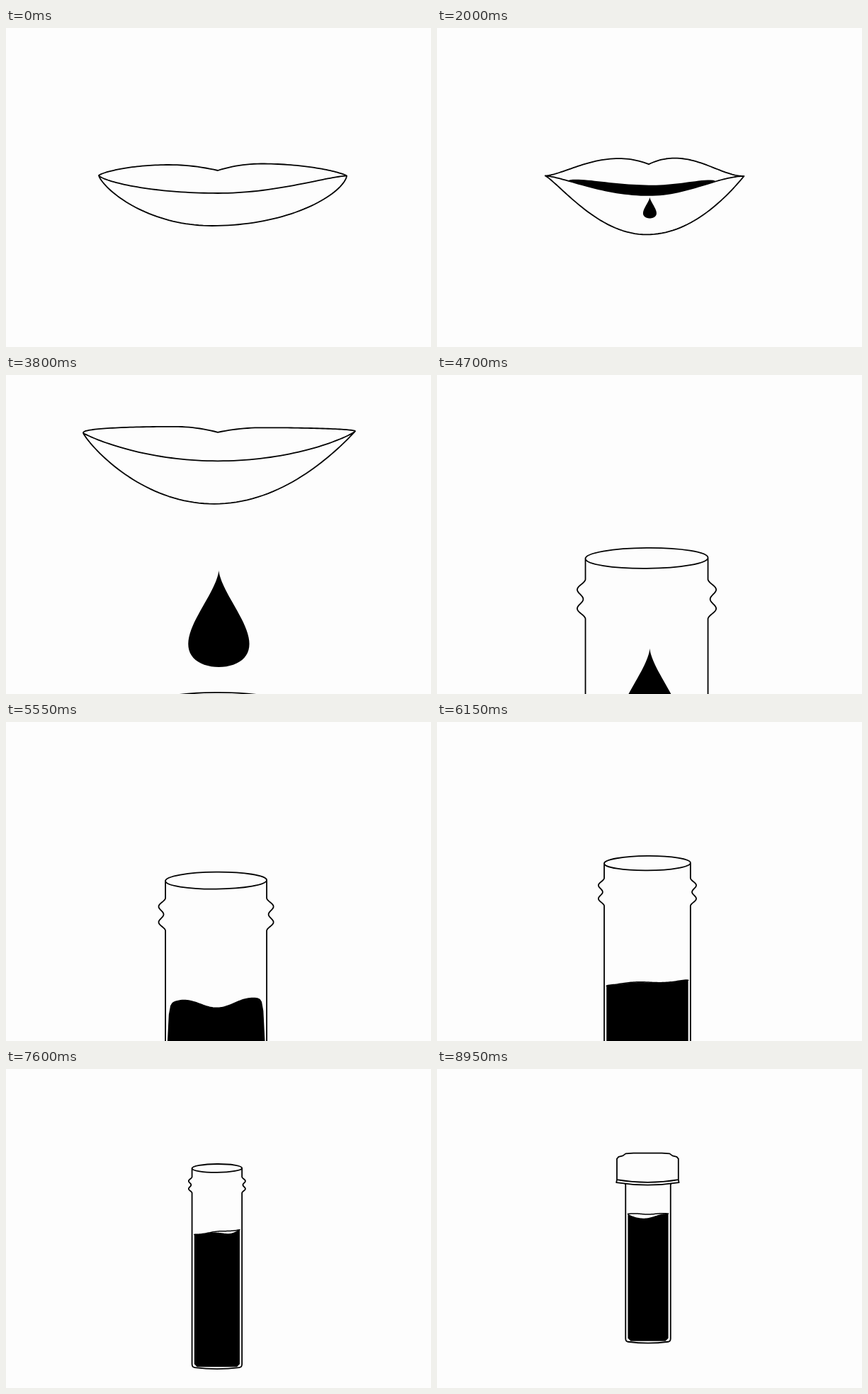
An HTML page with a canvas that plays this animation: 600x450 px, repeating every 9 s.

```html
<!DOCTYPE html>
<html lang="en">
<head>
<meta charset="utf-8">
<style>
html, body { margin: 0; width: 100%; height: 100%; overflow: hidden; background: #fdfdfd; }
canvas { display: block; }
</style>
</head>
<body>
<canvas id="stage" width="600" height="450"></canvas>
<script>
const ctx = document.getElementById('stage').getContext('2d');
const LOOP = 9000, STEP = 50, LINE = 1.8, PAPER = '#fdfdfd', INK = '#000';

const mix = (a, b, k) => a + (b - a) * k;
const smooth = u => 0.5 - 0.5 * Math.cos(Math.PI * u);
const linear = u => u;
const span = (t, from, to) => Math.min(1, Math.max(0, (t - from) / (to - from)));
const sample = (n, f) => Array.from({ length: n + 1 }, (_, i) => f(i / n));

// Value at time t between [time, value] keys.
function track(keys, t, ease = smooth) {
  let v = keys[0][1];
  for (let i = 1; i < keys.length; i++) {
    v = mix(v, keys[i][1], ease(span(t, keys[i - 1][0], keys[i][0])));
  }
  return v;
}

// Extremes of each lip edge, followed by how round the edge is on its way to the corners.
const REST = {
  left: [131, 208], right: [481, 208.5], notch: [299, 201],
  crestL: [230, 193, 0.76], crestR: [360, 191.5, 0.8],
  inner: [299, 233, 0.7, 1.4], lower: [291, 279, 0.75, 0.65]
};
const PURSED = {
  left: [153, 208.5], right: [433, 209], notch: [299, 192],
  crestL: [257, 184, 1.6], crestR: [335, 183.5, 2],
  inner: [299, 236, 1.45, 1.9], lower: [296, 291.5, 1.2, 1]
};
const SMILE = {
  left: [109, 202], right: [493, 199.5], notch: [299, 201],
  crestL: [238, 193, 0.4], crestR: [362, 194.5, 0.5],
  inner: [299, 241.5, 0.9, 0.85], lower: [294, 302, 0.87, 0.98]
};

const POSE = [[1200, 0], [2050, 1], [2150, 1], [3250, 2], [3450, 2.06], [3800, 2]];
const PAN = [[3500, 0], [4205, 313]];
const DROP_SIZE = [[1690, 0], [2000, 0.22], [3150, 1]];
const DROP_Y = [[1690, 232], [3800, 275], [4150, 283]];
const WIDTH = [[4400, 183.6], [7800, 63.5]];
const LEVEL = [[4750, 190], [5550, 130], [6750, 163.5], [7600, 136], [7850, 123]];
const TILT = [[5550, -3], [6750, -6], [7600, -9.5], [8950, -0.5]];
const SKEW = [[5550, 0], [6750, -1], [7600, 1.26], [8950, -0.67]];
const CREST = [[5550, 0.16], [6750, 0.55], [7600, 0.5], [8950, 0.15]];
const CAP_Y = [[7900, -112], [8750, 0]];

function line(points) {
  points.forEach((p, i) => i ? ctx.lineTo(...p) : ctx.moveTo(...p));
}

function stroke(width = LINE) {
  ctx.lineWidth = width;
  ctx.stroke();
}

function fillShape(points) {
  ctx.beginPath();
  line(points);
  ctx.fill();
}

// Rounded arc from a mouth corner to the extreme of an edge.
const arc = ([cx, cy], [px, py], round) => sample(40, u => {
  const a = u * Math.PI / 2;
  return [mix(px, cx, Math.cos(a)), mix(cy, py, Math.sin(a) ** (2 * round))];
});

const dip = ([x, y], [nx, ny]) => sample(12, u => [mix(x, nx, u), mix(y, ny, u * u)]);

function lipPose(s) {
  const [a, b, k] = s < 1 ? [REST, PURSED, s] : [PURSED, SMILE, s - 1];
  const pose = {};
  for (const part in a) pose[part] = a[part].map((v, i) => mix(v, b[part][i], k));
  return pose;
}

function drawLips(t, pan) {
  const s = track(POSE, t);
  const { left, right, notch, crestL, crestR, inner, lower } = lipPose(s);
  const edge = e => [...arc(left, e, e[2]), ...arc(right, e, e[3]).reverse()];
  const mouth = edge(inner);
  ctx.save();
  ctx.translate(0, -pan);
  ctx.beginPath();
  line([...arc(left, crestL, crestL[2]), ...dip(crestL, notch)]);
  line([...arc(right, crestR, crestR[2]), ...dip(crestR, notch)]);
  line(mouth);
  line(edge(lower));
  stroke();

  const open = 14.5 * Math.max(0, 1 - Math.abs(s - 1));
  const gap = x => open * Math.max(0, 1 - ((x - 289.5) / 104.5) ** 2) ** 0.65;
  fillShape([...mouth, ...mouth.map(([x, y]) => [x, y - gap(x)]).reverse()]);
  ctx.restore();
}

function drawDrop(t) {
  const size = track(DROP_SIZE, t, linear);
  if (!size || t > 4900) return;
  ctx.save();
  ctx.translate(300.4, track(DROP_Y, t, linear) + 190 * span(t, 4150, 4900) ** 2);
  ctx.scale(size, size);
  fillShape(sample(80, u => {
    const a = 2 * Math.PI * u;
    return [68.3 * Math.sin(a) * Math.sin(a / 2) ** 2.2, 68.5 * (1 - Math.cos(a))];
  }));
  ctx.restore();
}

// One half of the tube: neck with two ridges, straight wall, rounded foot.
function tubeSide(dir) {
  const ridges = sample(40, u => {
    const bulge = 5.4 * Math.sin(2 * Math.PI * u) ** 2 + 1.8 * Math.sin(Math.PI * u);
    return [dir * (50 + bulge), mix(26, 58, u)];
  });
  line([[dir * 50, 8.5], ...ridges, [dir * 50, 400]]);
  ctx.quadraticCurveTo(dir * 50, 406.5, dir * 45, 407);
  ctx.quadraticCurveTo(dir * 22, 410, 0, 410);
}

function drawLiquid(t, s) {
  const level = track(LEVEL, t), tilt = track(TILT, t), crest = track(CREST, t);
  const splash = 1 - smooth(span(t, 5550, 6200));
  const gap = Math.max(0, (t - 6000) / 310), skew = 2 ** track(SKEW, t);
  const half = 50 - 3.2 / s, base = 410 - 3 / s, r = 4 / s;
  const back = sample(60, u => [
    mix(-half, half, u),
    level + tilt * (u - 0.5)
      - (1 + 3.3 * splash) * Math.cos(2 * Math.PI * (u - crest) / 0.71)
      + 42 * splash * Math.abs(2 * u - 1) ** 40
  ]);
  const front = back.map(([x, y], i) =>
    [x, y + gap * Math.abs(Math.sin(Math.PI * (i / 60) ** skew)) ** 1.5]);
  fillShape([...front, [half, base - r], [half - r, base], [r - half, base], [-half, base - r]]);
  ctx.beginPath();
  line(back);
  stroke(1.5 / s);
}

function drawTube(t, pan) {
  const w = track(WIDTH, t, linear), s = w / 100;
  ctx.save();
  ctx.translate(298 - 0.018 * (w - 64), 126.3 + 1.07 * (w - 63.5) + 313 - pan);
  ctx.scale(s, s);
  if (t >= 4750) drawLiquid(t, s);
  ctx.beginPath();
  ctx.ellipse(0, 8.6, 50, 8.4, -0.008, 0, 2 * Math.PI);
  tubeSide(-1);
  tubeSide(1);
  stroke(LINE / s);
  ctx.restore();
}

function drawCap(t) {
  if (t < 7900) return;
  const side = [[20, 0], [31, 0.8], [35, 3.8], [41, 5.3], [43.4, 8], [43.4, 37.5], [44.2, 41.5]];
  const mirror = side.map(([x, y]) => [-x, y]).reverse();
  ctx.save();
  ctx.translate(297.4, 118.6 + track(CAP_Y, t));
  ctx.beginPath();
  line([...mirror, ...side]);
  ctx.quadraticCurveTo(0, 48.5, -44.2, 41.5);
  ctx.fillStyle = PAPER;
  ctx.fill();
  ctx.moveTo(-43.4, 37.5);
  ctx.quadraticCurveTo(0, 45, 43.4, 37.5);
  stroke();
  ctx.restore();
}

function draw(t) {
  ctx.fillStyle = PAPER;
  ctx.fillRect(0, 0, 600, 450);
  ctx.fillStyle = ctx.strokeStyle = INK;
  ctx.lineJoin = ctx.lineCap = 'round';
  const pan = track(PAN, t);
  drawLips(t, pan);
  drawTube(t, pan);
  drawDrop(t);
  drawCap(t);
}

const start = performance.now();
function tick() {
  const t = (performance.now() - start) % LOOP;
  draw(Math.floor(t / STEP) * STEP);
  requestAnimationFrame(tick);
}
tick();
</script>
</body>
</html>
```
